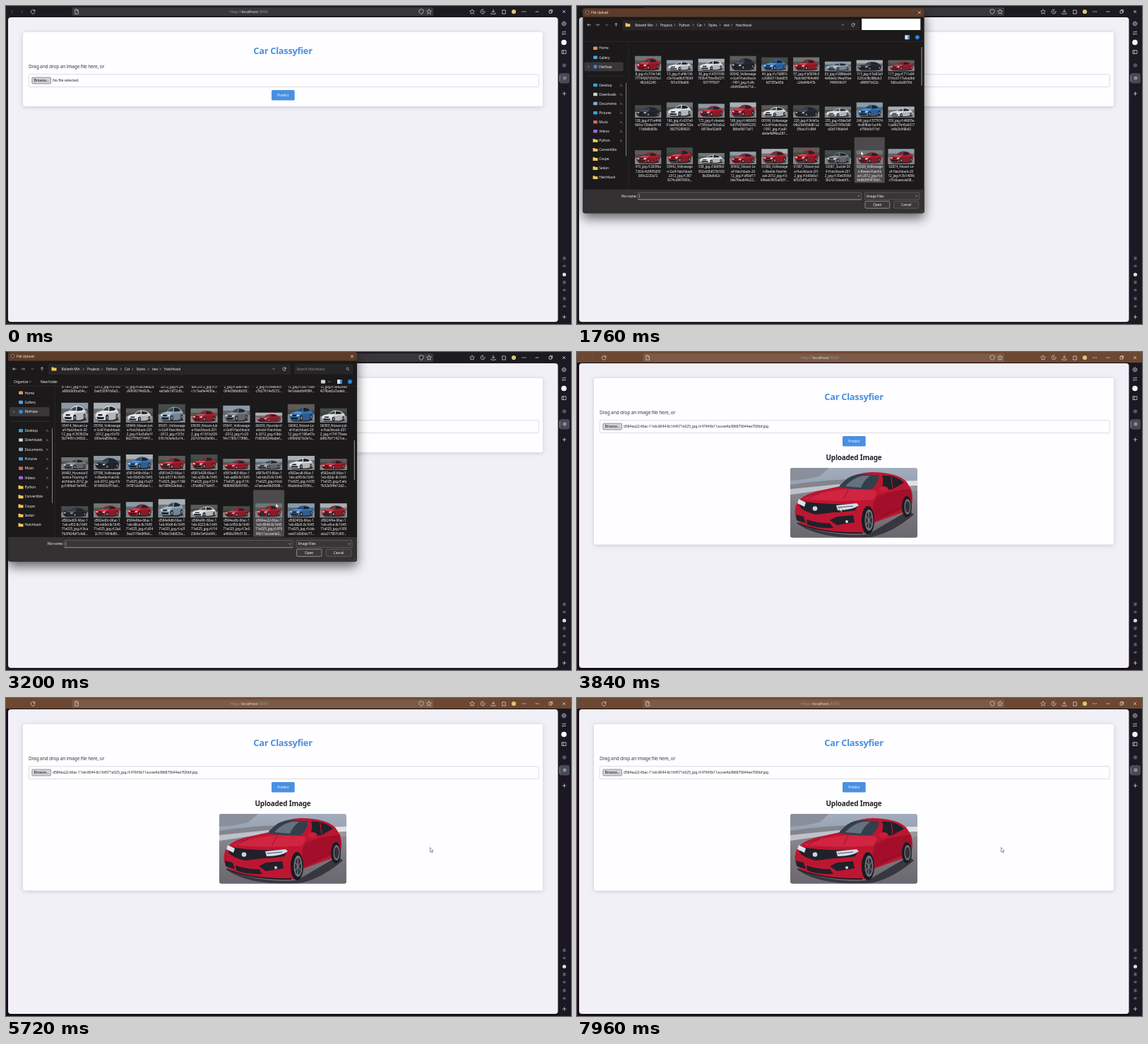
An HTML page that plays this animation: 800 by 450 pixels, repeating every 8000 ms.

```html
<!DOCTYPE html>
<html lang="en">
<head>
<meta charset="utf-8">
<title>Car Classyfier</title>
<style>
html, body { margin: 0; width: 100%; height: 100%; overflow: hidden; background: #1c1b20; }
svg { display: block; width: 100vw; height: 100vh; }
text { font-family: "Noto Sans", "Open Sans", sans-serif; letter-spacing: -.02em; white-space: pre; }
#dialogBack { filter: drop-shadow(0 7px 8px rgba(0, 0, 0, .6)); }
.card { filter: drop-shadow(0 1px 3px rgba(40, 30, 60, .2)); }
</style>
</head>
<body>
<svg id="stage" viewBox="0 0 800 450"></svg>
<script>
const LOOP = 8000;
const rect = (x, y, w, h, fill, r = 0, more = '') =>
  `<rect x="${x}" y="${y}" width="${w}" height="${h}" fill="${fill}" rx="${r}" ${more}/>`;
const disc = (x, y, r, fill, more = '') => `<circle cx="${x}" cy="${y}" r="${r}" fill="${fill}" ${more}/>`;
const oval = (x, y, rx, ry, fill) => `<ellipse cx="${x}" cy="${y}" rx="${rx}" ry="${ry}" fill="${fill}"/>`;
const shape = (d, fill) => `<path d="${d}" fill="${fill}"/>`;
const line = (d, color = '#d2d0d4', w = .8) => `<path d="${d}" fill="none" stroke="${color}" stroke-width="${w}"/>`;
const group = (id, body) => `<g id="${id}">${body}</g>`;
// y is the middle of the capitals
const text = (x, y, s, size, fill, more = '') =>
  `<text x="${x}" y="${y + size * .36}" font-size="${size}" fill="${fill}" ${more}>${s}</text>`;
const MID = 'text-anchor="middle" ', BOLD = 'font-weight="700" ';
const plus = (x, y) => line(`M${x - 2.7} ${y}h5.4M${x} ${y - 2.7}v5.4`);
const cross = (x, y, c) => line(`M${x - 2} ${y - 2}l4 4m0 -4l-4 4`, c);
const chevron = (x, y, c = '#c8c6c6') => line(`M${x - .8} ${y - 1.5}l1.6 1.5l-1.6 1.5`, c, .6);
const down = (x, y) => line(`M${x - 1.6} ${y - .8}l1.6 1.6l1.6 -1.6`, '#d0cece', .6);
const reload = (x, y, r) => line(`M${x + r} ${y - r * .3}A${r} ${r} 0 1 0 ${x + r} ${y + r * .4}M${x + r} ${y - r}v${r * .8}h${-r * .8}`);
const star = (x, y) => line(`M${x} ${y - 3.4}l1 2.3 2.4.2-1.8 1.7.6 2.4-2.2-1.3-2.2 1.3.6-2.4-1.8-1.7 2.4-.2z`, '#d2d0d4', .7);

function browser() {
  const small = [357, 368, 391, 402, 414, 425].map((y, i) => i % 2
    ? oval(790.5, y, 2.3, 1.7, '#5d5c66') : rect(788.5, y - 2.2, 4, 4.4, '#5a5963', .7)).join('');
  return rect(0, 0, 800, 450, '#1c1b20') + rect(782, 0, 18, 450, '#1b1a24') +
    rect(93.5, 2, 511.5, 12, '#39373a', 2) +
    group('activeBar', rect(0, 0, 800, 450, '#180b1c') + rect(782, 14, 18, 436, '#1b1824') +
      rect(0, 0, 800, 15, '#6c4731') + rect(93.5, 2, 511.5, 12, '#7b5a47', 2)) +
    line('M9.5 5.5l-2.5 2.5 2.5 2.5M21.5 5.5l2.5 2.5 -2.5 2.5', '#66626a') + reload(38, 8, 2.9) +
    line('M97.8 4.8h2.8l1.8 1.8v4.6h-4.6zM100.4 5v1.8h2') +
    text(344, 8.3, 'http://<tspan fill="#dedce0">localhost</tspan>:3000', 5.75, '#97949a', MID) +
    line('M588 4.6l3 1v2.2q0 2.4-3 3.8q-3-1.4-3-3.8v-2.2z', '#d2d0d4', .7) + star(599, 8) + star(660, 8) +
    line('M677.9 7a3 3 0 1 1 -1.5 -1.8M675 6v2.2l1.5.8') +
    line('M690 4.5v4.5m-2 -2l2 2 2 -2M687 9.5v1.7h6v-1.7') +
    line('M702.5 6h1.6q.6-2 1.3 0h1.9v5h-4.8v-1.4q1.7-.9 0-1.7z') + disc(719, 8, 3.1, '#d6c879') +
    [731, 733.2, 735.4].map(x => disc(x, 8, .65, '#d2d0d4')).join('') +
    line('M749.5 8h5M769 6.6h3.5v3.5h-3.5zM770.2 6.5v-1.2h3.5v3.5h-1.1') + cross(790, 8, '#d2d0d4') +
    disc(790, 25, 2.3, 'none', 'stroke="#d2d0d4" stroke-width=".8"') +
    disc(790, 25, 3.1, 'none', 'stroke="#d2d0d4" stroke-width=".7" stroke-dasharray="1.2 1.23"') + disc(790, 25, .8, '#d2d0d4') +
    line('M787 36.8h5.5m-1.3 -1.3l1.4 1.3M793 39.6h-5.5m1.3 1.3l-1.4 -1.3') + disc(790, 51.5, 3.8, '#f5f3f7') +
    line('M787 62.8h6v4.7h-6zM789.2 62.8v4.7') + disc(790.5, 84, 2.8, '#55545e') +
    rect(783.5, 95, 14.5, 14.5, '#4a4852', 3) + rect(783.5, 97.5, 1, 9.5, '#a77cc4', .5) + disc(791, 102, 2.8, '#777986') +
    group('tabDot', disc(791, 102, 2.2, '#6f9aa5')) + plus(790.5, 124) +
    small + disc(790.5, 380, 2.6, '#dddce2') + plus(790.5, 440) +
    rect(3, 16, 778.5, 431, '#f2f0f7', 4);
}

function carPhoto() {
  const red = '#bd1631', dark = '#20212a';
  return `<g clip-path="url(#photoClip)">` + rect(302, 164, 180, 99, 'url(#sky)') +
    shape('M302 164h55l-14 12q-20 5-41 6z', '#8a8f9b') + shape('M302 188q50-8 100-8l80 8v75H302z', '#83858d') +
    shape('M302 205q80-14 180-8v66H302z', 'url(#road)') +
    shape('M302 194l70-7v5l-70 10z', '#bfc2ca') + shape('M440 183l42-1v7l-42 3z', '#e1e0e2') + shape('M440 192l42-3v7l-42 4z', '#9b9697') +
    shape('M312 243q50 19 100 15l58-34 7 6q-32 27-62 32-70 4-103-19z', '#38373f') +
    shape('M309 222C311 208 322 202 340 197L372 190C384 176 398 171 418 170C440 170 458 175 466 183L472 192C475 200 476 208 474 216L470 224 422 241 408 256C392 260 350 254 326 247C312 242 307 234 309 222Z', red) +
    shape('M422 207q25-10 51-13 2 12-1 23l-50 23q-6-18 0-33z', '#a30f2a') +
    shape('M320 208q48-19 103-12 3 5-4 13-46 4-99-1z', '#d02440') +
    line('M343 200q-10 3-16 8M384 195l-7 13M424 205q24-9 47-10M429 233l40-18', '#830d24', .8) +
    shape('M371 191C379 180 388 174 400 173L427 174C428 181 424 189 417 194 400 195 385 194 371 191Z', '#343e4d') +
    shape('M380 190q10-12 25-15l10 0q-10 8-13 17z', '#65717d') +
    shape('M432 175C445 174 456 178 463 185L447 194 429 196C434 188 434 181 432 175Z', dark) + line('M445 177l2 16', red, 1.2) +
    oval(434, 194, 6.5, 4, '#cb1d38') +
    shape('M316 211q22 3 43 4l39 1-4 8q-18 3-31 3l-24 3q-19-4-24-12z', dark) +
    shape('M314 208l10 5-2 6-10-5z', '#dce2e9') + shape('M367 217l29-3 3 3q-9 7-30 7z', '#d4dce5') + line('M369 220l22-2', '#4d5462', 1.2) +
    disc(337, 221.5, 3.3, '#cfd2d7') +
    shape('M310 230l11 3 3 9-13-4z', dark) + shape('M325 237q18 6 33 5l5 7q-24 1-37-5z', dark) + shape('M368 233l23-2 2 10-25 4-10-7z', dark) +
    disc(382, 240, 2, '#d8d5d4') + line('M312 242q35 15 92 14', '#1d1c23', 1.8) +
    oval(412, 238, 9, 20, '#1b1b21') + oval(413.5, 238, 6, 15, '#777780') + oval(413.5, 238, 4.5, 12, '#303038') +
    line('M413 226v24M409 232l9 13M418 231l-9 14', '#91919a', .9) +
    oval(467, 219, 7, 15, '#1b1b21') + oval(468, 219, 4.6, 11, '#707079') + oval(468, 219, 3.2, 8, '#303038') + '</g>';
}

function page() {
  return group('shortCard', rect(24, 37, 736, 105, '#fefdff', 3, 'class="card"')) +
    group('result', rect(24, 37, 736, 235.5, '#fefdff', 3, 'class="card"') +
      text(392, 149.5, 'Uploaded Image', 9.95, '#222126', MID + BOLD) + carPhoto()) +
    text(392, 63.5, 'Car Classyfier', 12.8, '#4a90e2', MID + BOLD) +
    text(32, 86, 'Drag and drop an image file here, or', 6.55, '#38363b') +
    rect(32.2, 96.7, 722, 17.8, '#fefdff', 1.5, 'stroke="#cfcdd3" stroke-width=".7"') +
    group('inputHover', rect(32, 96.5, 722.2, 18, '#c9c8ca', 1.5)) +
    rect(36.8, 101, 26.7, 9, '#d2d1d8', 1.2, 'stroke="#77767e" stroke-width=".7"') +
    text(50, 105.6, 'Browse...', 5.2, '#18171b', MID + 'font-weight="500"') +
    group('noFile', text(66, 105.6, 'No file selected.', 5.25, '#28272b')) +
    group('fileName', text(66, 105.6, 'd584ea22-66ac-11eb-8044-8c164571e025_jpg.rf.47945b11accee4a386875644ee7f26bf.jpg', 5.07, '#28272b')) +
    rect(376, 119, 32.7, 14.5, '#4a90e2', 1.6) + text(392.3, 126.4, 'Predict', 5.15, '#eef5ff', MID);
}

// Each thumbnail: body colour letter and height step; labels break at "|".
const PAINT = { r: '#b31d2c', w: '#dcdfe2', k: '#272b36', b: '#3474b8', g: '#777b82', s: '#8da5b7' };
const SCENE = ['#6f7673', '#a9afb2', '#454d4a', '#8b9aa6', '#5f5b58'];
const LOOKS = ['r4 w1 w2 k4 b3 r3 s0 k1 r1', 'k2 w4 r3 r4 w2 k2 w1 b4 w1', 'r3 r5 w1 r2 r4 r5 g3 r3 r4',
  'w3 g3 r2 b3 w3 s3 k2 r3 w4', 'w7 w7 w3 s6 r3 g5 r0 b6 w3', 'g2 k3 b4 r3 r4 r1 g1 w3 r1', 'k1 r3 r4 s6 w2 r1 r3 b3 r3'];
const uuid = s => s.split(' ').map(e => {
  const [a, b, c, d] = e.split('/');
  return `${a}-66ac-1|1eb-${b}-8c1645|71e025_jpg.rf.${c}|${d}...`;
}).join(' ');
const NAMES = [
  '8_jpg.rf.c314c1d6|777942876503fa1|482c82240 13_jpg.rf.af4b136|c5e16ad9b57666f|501e55bd06 38_jpg.rf.4531936|705b475be5bf271|9377f792f7 00042_Volkswage|n-Golf-Hatchback|-1991_jpg.rf.a9c|a5d436eefa71d... 44_jpg.rf.c7d897c|ccfa9b0110eb835|fd7355e65d 57_jpg.rf.b5034c0|7bdcfd67f64e96f|c26d44b47b 63_jpg.rf.888ded4|4d4de0c34ea95ee|74f9094c97 113_jpg.rf.5a83a9|023ce38c88bdc3|df8f9f1bf22c 117_jpg.rf.711a94|319cc6117abadbb|3d6ca0a90766',
  '128_jpg.rf.f1a4f46|969cc150dec4149|11b8d8d83b 166_jpg.rf.c657e9|91ae89d385e702e|38275289920 172_jpg.rf.c4edeb|e7300cbe7b5a0a2|6870be52d69 188_jpg.rf.468903|9d5795586f022f2|88bd5817a91 00199_Volkswage|n-Golf-Hatchback|-1991_jpg.rf.ad0|abda4df4ba287... 220_jpg.rf.9cfe5a|64b2fbf658d81a2|35bac51c884 235_jpg.rf.8de3df|f9822a573f5b580|d2b5196dcb4 249_jpg.rf.577974|4cd6f8de1ac44c|e706b0d11bf 330_jpg.rf.49835e|1ca8627b43a6017|b4b2b548af2',
  '419_jpg.rf.263fba|7263c4c0f6f3d55|089c2220a72 00442_Volkswage|n-Golf-Hatchback|-2012_jpg.rf.387|5274cd997830c... 538_jpg.rf.8df0b0|392afd3df23fc592|8e20bdb92c 00992_Nissan-Le|af-Hatchback-20|12_jpg.rf.df0af17|0eb76ea644c22... 01080_Volkswage|n-Beetle-Hatchb|ack-2012_jpg.rf.6|84beb3905a0631... 01587_Nissan-Juk|e-Hatchback-201|2_jpg.rf.b98d6a1|bf323df5a0313f... 02061_Suzuki-SX|4-Hatchback-201|2_jpg.rf.30e0050d|3624216deebf3... 02629_Volkswage|n-Beetle-Hatchb|ack-2012_jpg.rf.d|6b8808f397bb0... 02814_Nissan-Le|af-Hatchback-20|12_jpg.rf.3b14996|c70c6aaecda58...',
  '03107_Volkswage|n-Golf-Hatchbac|k-1991_jpg.rf.590|a80b0bf0ca54c... 03218_Volkswage|n-Golf-Hatchback|-2012_jpg.rf.9169|0ae532f91b9a3... 03390_Nissan-Le|af-Hatchback-20|12_jpg.rf.d838e828|c909301f4d02b... 03522_Volkswage|n-Golf-Hatchback|-2012_jpg.rf.2ef|ee3a8c1872cf6... 03874_Volkswage|n-Beetle-Hatchb|ack-2012_jpg.rf.9|c1c7ae0e4430a... 04066_Nissan-Juk|e-Hatchback-201|2_jpg.rf.a8b1481|004d36bbfb03f... 04431_Suzuki-SX|4-Hatchback-201|2_jpg.rf.cfee840c|c7b27614e5272... 04790_Nissan-Le|af-Hatchback-20|12_jpg.rf.08719a9|9e1dabdfd4599... 05102_Nissan-Le|af-Hatchback-20|12_jpg.rf.5e82e9a|4278ad2a7aded...',
  '05414_Nissan-Le|af-Hatchback-20|12_jpg.rf.333923e|5b74451c34502... 05766_Volkswage|n-Golf-Hatchback|-2012_jpg.rf.b70|695e4a85fbcbc... 05849_Nissan-Juk|e-Hatchback-201|2_jpg.rf.6a3a9a1f|8d27f796714f41... 05931_Volkswage|n-Golf-Hatchback|-2012_jpg.rf.57d|07b1fcfa4e3a14... 05939_Nissan-Juk|e-Hatchback-201|2_jpg.rf.161fa329|2b7c91bd3e90c... 05941_Volkswage|n-Golf-Hatchback|-2012_jpg.rf.c23|54c1785c173f86... 06059_Hyundai-V|eloster-Hatchbac|k-2012_jpg.rf.8dc|f180365246abef... 06092_Nissan-Le|af-Hatchback-20|12_jpg.rf.180e47a|c990b921b0e1c... 06393_Nissan-Juk|e-Hatchback-201|2_jpg.rf.74175eea|d6fb7bf11421ce...',
  '06483_Hyundai-E|lantra-Touring-H|atchback-2012_jp|g.rf.89bd15e949... 07788_Volkswage|n-Beetle-Hatchb|ack-2012_jpg.rf.b|8169600cff1fad... ' +
  uuid('d581b46b/90d3/a27/34781da45dae1 d581b423/b517/168/8a108fe52e8ab d581b428/a20b/514/cf7a98b71b847 d581b463/ae88/1fc/9880685fd91f09 d581b473/bb25/6cb/a7aecee68d5088 d582eca8/a0f5/435/86abb6ac9306c d582ecd3/82dc/efa/7b32d34fe12d2'),
  uuid('d582ed00/af52/9ca/7b3f424df1cfe8 d582ed0c/bb9d/2ad/2c7011904b89 d584e9be/88ce/d34/3ea3178e6f9b6 d584e9d8/90d4/e2f/77e0bc5db825a d584e9fc/9223/f14/23b9e7a42e699 d584ea0b/b956/3e0/a480b29fb3130 d584ea22/8044/479/45b11accee4a3 d5824f2b/88a5/cbb/cee01d0d0dc77 d5824f4e/a9ce/93f/aba217857c0f0')];
const COL = 45.8, ROW = 67.2, FIRST_X = 97.3, FIRST_Y = 91;

const wheel = (x, y, rx, ry) => oval(x, y, rx, ry, '#17181c') + oval(x + .2, y, rx * .55, ry * .6, '#85878c');

function thumb(row, col) {
  const [paint, step] = LOOKS[row].split(' ')[col];
  const h = 14 + step * 2, x = FIRST_X + col * COL, base = FIRST_Y + row * ROW;
  const car = rect(0, 0, 38, 20, SCENE[(row * 7 + col * 3) % 5]) + rect(0, 6, 38, 5, '#34383580') +
    rect(0, 11, 38, 9, '#85868a') + shape('M3 16h31l2 1.5-8 1.5H7z', '#2c2d32') +
    shape('M2.5 14Q2 10.2 6 9.2L12 8Q15.5 3.6 21 3Q28 2.6 32 6L35 9Q36.5 12 35.5 15L27 17.4H8Q3.4 17.6 2.5 14Z', PAINT[paint]) +
    shape('M6 9.6L12 8.2 21 8.4 18 10.6Q11 10.4 6 9.6Z', '#ffffff38') + shape('M19 10.5L35.5 9.5Q36 13 35.5 15L27 17.4H18Z', '#00000030') +
    shape('M12.8 7.9Q16 4.4 21 4L20.8 8Z', '#3a4652') + shape('M22.3 3.9Q28 3.6 31.5 6.6L29 7.9 22 8.3Z', '#1f242c') +
    shape('M3.5 11l3 .4-.6 1.5-2.6-.7zM12.5 11.8l4-.6-.5 1.6-3 .5z', '#e2e6e9') +
    shape('M6.5 11.6h6l-.5 1.6H6.3zM4 14.2l11 .4-1 2H5.5z', '#1c1d23') + wheel(19, 15.2, 2.1, 3.2) + wheel(33, 13.8, 1.5, 2.8);
  const label = NAMES[row].split(' ')[col].split('|')
    .map((s, i) => text(x, base + 4.2 + i * 6.15, s, 4.75, '#f2f0f2', MID)).join('');
  return `<g transform="translate(${x - 19} ${base - h}) scale(1 ${h / 20})">${car}</g>` + label;
}

const folder = (x, y) => shape(`M${x - 3.5} ${y - 2.5}h2.5l1 1h3.5v4h-7z`, '#f2c65a');

function places() {
  const items = ['Home', 'Gallery', 'FileHaze', '', 'Desktop', 'Downloads', 'Documents', 'Pictures', 'Music', 'Videos',
    'Python', 'Convertible', 'Coupe', 'Sedan', 'Hatchback'];
  const tints = ['#d99a63', '#4aa3dd', '#2b8be0', '', '#38a3d8', '#c9d1d6', '#8fa9c4', '#3f9ae0', '#d95f6c', '#9a68d6'];
  return rect(5, 78, 56.5, 13, '#383637', 1.5) + chevron(11, 84.5) + line('M7 98h56', '#3b393a', .6) +
    items.map((name, i) => {
      const y = 57.8 + i * 13.35;
      if (!name) return '';
      const icon = i > 9 ? folder(21, y) : i === 2 ? disc(21, y, 2.8, tints[i]) : rect(18, y - 2.3, 6, 4.6, tints[i], 1);
      const pin = i > 3 && i < 11 ? line(`M57 ${y + 1.6}l1.5-1.5m-1.4-1.6l2.9 2.9`, '#a09ea0', .7) : '';
      return icon + text(26.5, y, name, 4.9, '#f2f0f2') + pin;
    }).join('') + rect(65, 108, .9, 106, '#929092', .4);
}

function dialog() {
  const crumbs = [[78.5, 'Rolveth Min'], [115, 'Projects'], [142, 'Python'], [168, 'Car'], [184.5, 'Styles'], [207, 'test'], [224, 'Hatchback']];
  const items = LOOKS.map((_, r) => Array.from({ length: 9 }, (_, c) => thumb(r, c)).join('')).join('');
  return rect(3, 0, 494, 296.5, '#1b191a', 3, 'id="dialogBack"') +
    shape('M3 12.5V3q0-3 3-3h488q3 0 3 3v9.5z', '#5d3c29') + disc(9.5, 6, 2.3, '#2a2527', 'stroke="#d0c4bc" stroke-width=".6"') +
    text(15, 6.2, 'File Upload', 4.9, '#f0ebe8') + cross(490, 6.2, '#e8e0dc') +
    line('M14.5 24h-5m2 -2l-2 2 2 2') + line('M21.5 24h5m-2 -2l2 2-2 2', '#a19fa0') + down(37.5, 24) + line('M51 26.5v-5m-2 2l2-2 2 2') +
    rect(60, 17, 343, 15, '#272526', 1.5) + folder(68, 24) +
    crumbs.map(([x, s]) => text(x, 24.3, s, 4.9, '#f2f0f2')).join('') +
    [109.5, 136, 162.5, 179, 201.5, 218.5].map(x => chevron(x, 24.2)).join('') + down(379, 24) + reload(394, 24, 2.2) +
    rect(408, 17, 83.5, 14.5, '#272526', 1.5) + text(411.5, 24.3, 'Search Hatchback', 4.9, '#959395') +
    disc(483.5, 23.6, 1.6, 'none', 'stroke="#c8c6c6" stroke-width=".6"') + line('M484.7 24.9l1.6 1.6', '#c8c6c6', .6) +
    group('searchBlank', rect(406.5, 15, 85, 16.5, '#fff')) +
    group('toolbar', text(11, 42, 'Organize', 4.9, '#f2f0f2') + down(34, 42) + text(49, 42, 'New folder', 4.9, '#f2f0f2') +
      rect(446, 39.5, 6, 5, '#c9d4dc', .5) + down(458, 42)) +
    rect(469, 39, 6.5, 6, '#d9e4ee', .5) + rect(473, 39, 2.5, 6, '#3d8edb') + disc(487, 42, 3.2, '#1d75cf') + text(487, 42, '?', 4.3, '#fff', MID) +
    line('M3 48h494M69 48v214', '#343233', .6) + places() +
    `<g clip-path="url(#listClip)">` + group('list', group('hover', rect(0, 186.5, 44, 66, '#4c4a4c', 1)) + items) + '</g>' +
    group('thumbBar', rect(492.8, 56, 1, 56, '#a3a1a3', .5)) +
    shape('M3 262h494v31.5q0 3-3 3H6q-3 0-3-3z', '#333132') +
    text(81, 271.5, 'File name:', 4.9, '#f2f0f2', 'text-anchor="end"') +
    rect(82.5, 266.5, 323.5, 10.2, '#383637', 1, 'stroke="#7b797a" stroke-width=".5"') + line('M82.5 276.7h323.5', '#a8a6a8', .7) +
    line('M84.7 268.5v6', '#eeecee', .5) + down(402, 271.5) +
    rect(411, 266.5, 79, 10.2, '#383637', 1, 'stroke="#7b797a" stroke-width=".5"') + text(413.5, 271.5, 'Image Files', 4.9, '#f2f0f2') + down(486, 271.5) +
    rect(411.5, 279, 35.5, 10.3, '#3a3839', 1.5, 'stroke="#b4b2b4" stroke-width=".7"') + text(429.2, 284.2, 'Open', 4.9, '#f4f2f4', MID) +
    rect(453, 279, 36, 10.3, '#3a3839', 1.5, 'stroke="#7b797a" stroke-width=".5"') + text(471, 284.2, 'Cancel', 4.9, '#f4f2f4', MID) +
    line('M492.5 295l2.5-2.5', '#8a888a', .6);
}

const gradient = (id, stops) => `<linearGradient id="${id}" x2="0" y2="1">` +
  stops.map((c, i) => `<stop offset="${i / (stops.length - 1)}" stop-color="${c}"/>`).join('') + '</linearGradient>';
document.getElementById('stage').innerHTML =
  `<defs>${gradient('sky', ['#a3adbc', '#8796aa', '#9299a4'])}${gradient('road', ['#8a898e', '#77757b', '#6a686e'])}
  <clipPath id="photoClip">${rect(302, 164, 180, 98.5, '#000', 3)}</clipPath>
  <clipPath id="listClip">${rect(70, 48.3, 422, 213.7, '#000')}</clipPath></defs>` +
  browser() + page() + group('dialog', dialog()) +
  group('cursor', `<path d="M0 0v6.6l1.5-1.3 1 2.3 1-.45-1-2.2h2z" fill="#fff" stroke="#4a494f" stroke-width=".55"/>`);

// Steps are [ms, values, easing to the next step]. Attributes, not layers, keep scaled text sharp.
const easeIn = u => u * u, easeOut = u => 1 - (1 - u) ** 2, hold = () => 0, linear = u => u;
const easeBoth = u => u * u * (3 - 2 * u);
const tracks = [];
const play = (id, steps, apply) => tracks.push({ el: document.getElementById(id), steps, apply });

function sample(steps, t) {
  const i = steps.findLastIndex(([ms]) => ms <= t);
  const [start, from, ease = linear] = steps[i];
  if (i === steps.length - 1) return from;
  const [end, to] = steps[i + 1], u = ease((t - start) / (end - start));
  return from.map((v, k) => v + (to[k] - v) * u);
}

const move = (el, [x, y]) => el.setAttribute('transform', `translate(${x} ${y})`);
const toggle = (el, [on]) => el.setAttribute('visibility', on ? 'visible' : 'hidden');
const pop = (el, [scale, opacity]) => {
  el.setAttribute('transform', `translate(250 148) scale(${scale}) translate(-250 -148)`);
  el.setAttribute('opacity', opacity);
  el.setAttribute('display', opacity ? 'inline' : 'none');
};
const show = (id, from, to = LOOP) => play(id, [[0, [from === 0 ? 1 : 0], hold], [from, [1], hold], [to, [0]]], toggle);

show('shortCard', 0, 3600);
show('inputHover', 720, 1640);
show('noFile', 0, 3600);
show('fileName', 3600);
show('result', 3600);
show('activeBar', 3480);
show('tabDot', 1680);
show('searchBlank', 0, 1840);
show('toolbar', 1840);
show('cursor', 120);

play('dialog', [[0, [.9, 0], hold], [1640, [.9, 0]], [1760, [.978, 1], easeOut], [1880, [1, 1]],
  [3420, [1, 1], easeIn], [3540, [.93, 0]]], pop);

const scroll = [[0, 0], [2080, 0], [2320, 87], [2400, 87], [2640, 173], [2720, 173], [2960, 260]];
play('list', scroll.map(([ms, s]) => [ms, [0, -s], easeOut]), move);
play('thumbBar', scroll.map(([ms, s]) => [ms, [0, s * .265], easeOut]), move);
const cell = (row, col) => [FIRST_X + col * COL - 22, (row - 2) * ROW];
play('hover', [[0, cell(2, 7), hold], [2160, cell(3, 7), hold], [2480, cell(4, 7), hold], [2560, cell(5, 7), hold],
  [2800, cell(6, 7), hold], [3000, cell(6, 6)]], move);

play('cursor', [[0, [250, 230]], [120, [250, 230], easeBoth], [880, [53.5, 105]], [1360, [53.5, 105], easeBoth],
  [1720, [402, 205]], [2880, [402, 205], easeBoth], [3120, [382, 214]], [3440, [382, 214], easeBoth],
  [3720, [372, 219]], [4280, [372, 219], easeBoth], [4960, [600.5, 211.5]]], move);

function draw() {
  const t = performance.now() % LOOP;
  for (const { el, steps, apply } of tracks) apply(el, sample(steps, t));
  requestAnimationFrame(draw);
}
draw();
</script>
</body>
</html>
```
